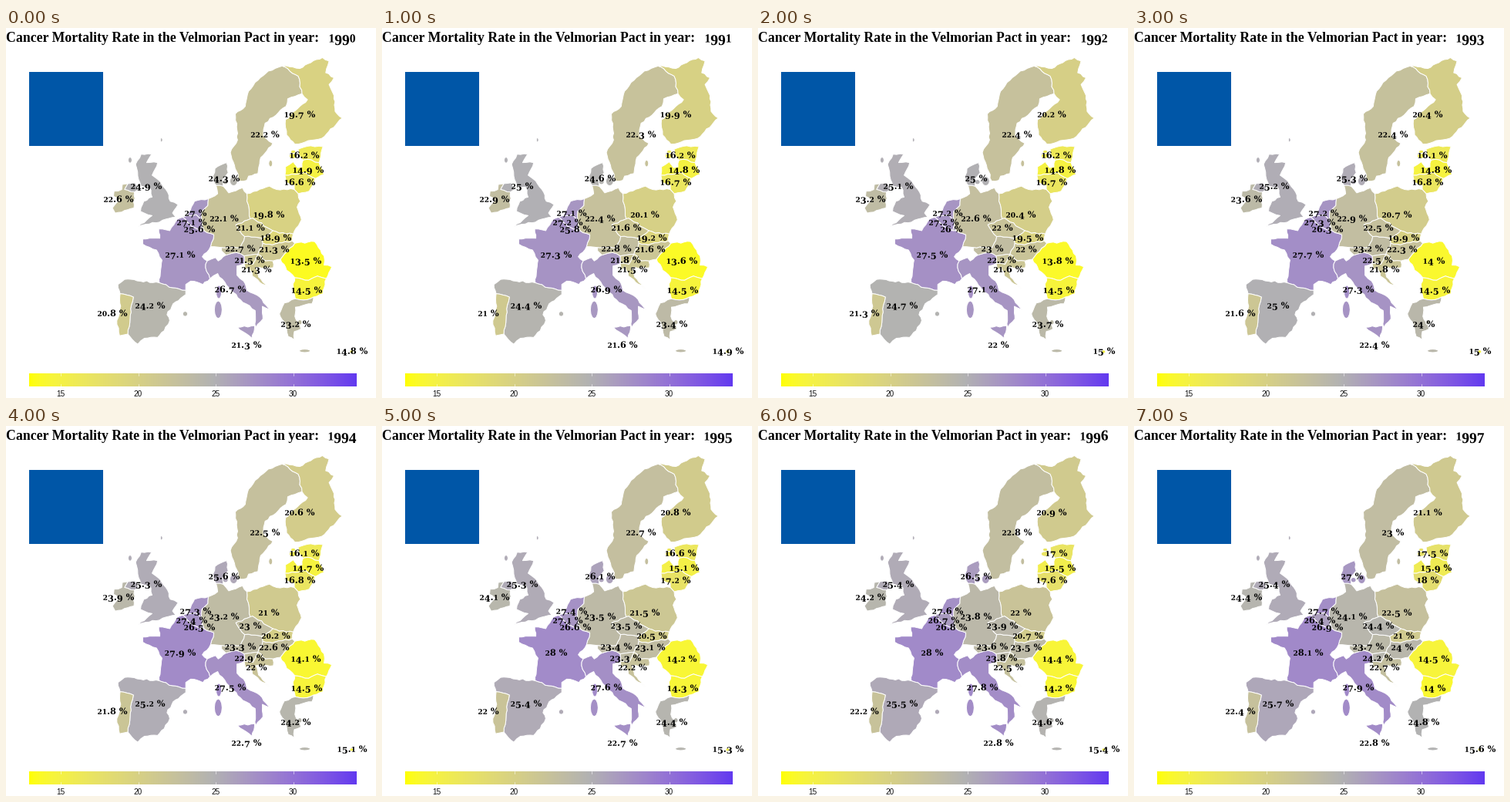
Write a matplotlib script that moves like this. It is 480x480 px and loops after 8000 ms.

```python
import random

import matplotlib.pyplot as plt
import numpy as np
from matplotlib.animation import FuncAnimation
from matplotlib.patches import PathPatch, Polygon, Rectangle
from matplotlib.path import Path
from matplotlib.textpath import TextPath

SIZE, DPI = 480, 100
PX = 72 / DPI
FIRST_YEAR, YEARS = 1990, 8
LOW, MIDDLE, HIGH = 12.96, 24.8, 34.1

# CIE Lab
YELLOW, GREY, BLUE = np.array([(97.1, -21.6, 94.5), (72.6, 0, 0), (32.3, 79.2, -107.9)])

LABEL_FONT = {"family": "DejaVu Serif", "weight": "bold"}
TITLE_FONT = {"family": "Liberation Serif", "weight": "bold"}

fig = plt.figure(figsize=(SIZE / DPI, SIZE / DPI), dpi=DPI, facecolor="white")
ax = fig.add_axes([0, 0, 1, 1])
ax.axis("off")


def lab_to_rgb(lab):
    f = (lab[0] + 16) / 116
    f = np.array([f + lab[1] / 500, f, f - lab[2] / 200])
    xyz = np.where(f > 6 / 29, f ** 3, 3 * (6 / 29) ** 2 * (f - 4 / 29))
    to_linear = np.array([(3.2405, -1.5371, -0.4985),
                          (-0.9693, 1.8760, 0.0416),
                          (0.0556, -0.2040, 1.0572)])
    linear = np.clip(to_linear @ (xyz * [0.9505, 1, 1.089]), 0, 1)
    return np.where(linear <= 0.0031308, 12.92 * linear,
                    1.055 * linear ** (1 / 2.4) - 0.055)


def rate_color(rate):
    """Diverging scale, blended in Lab, equally steep on both sides."""
    t = np.clip((rate - MIDDLE) / (MIDDLE - LOW), -1, 1)
    end = YELLOW if t < 0 else BLUE
    return lab_to_rgb(GREY + abs(t) * (end - GREY))


def right_edge(text, size, font):
    return TextPath((0, 0), text, size=size, prop=font).vertices[:, 0].max()


def old_style(text, cx, base, size, font):
    """Centred text path with old-style numerals."""
    x, glyphs = 0, []
    for ch in text:
        s = size * (0.8 if ch in "012" else 1)
        drop = size * (0.18 if ch in "34579" else 0)
        if ch != " ":
            glyphs.append(TextPath((x, -drop), ch, size=s, prop=font))
        x += right_edge(ch + "|", s, font) - right_edge("|", s, font)
    path = Path.make_compound_path(*glyphs)
    return Path(path.vertices * [1, -1] + [cx - x / 2, base], path.codes)


def text_patch():
    return ax.add_patch(PathPatch(Path([[0, 0]]), fc="black", lw=0, zorder=5))


def project(lon, lat):
    return 211 + 7.15 * lon, 421 - 10.9 * (lat - 35)


def rough_edge(p, q):
    """Jagged line from p to q, the same for both neighbours."""
    lo, hi = np.array(sorted([p, q]))
    rng = random.Random(f"{lo.round(2)}{hi.round(2)}")
    dx, dy = hi - lo
    length = np.hypot(dx, dy)
    n = max(1, int(length / 4))
    points = []
    for i in range(n + 1):
        shift = rng.uniform(-1, 1) if 0 < i < n else 0
        points.append(lo + (hi - lo) * i / n + np.array([-dy, dx]) / length * shift)
    if p > q:
        points.reverse()
    return points[:-1]


def outline(*coords):
    """Jagged ring through lon, lat, lon, lat, ..."""
    ring = [project(*c) for c in zip(coords[::2], coords[1::2])]
    return [pt for p, q in zip(ring, ring[1:] + ring[:1]) for pt in rough_edge(p, q)]


def island(lon, lat, width, height):
    a = np.linspace(0, 2 * np.pi, 12, endpoint=False)
    return np.column_stack(project(lon + width / 2 * np.cos(a),
                                   lat + height / 2 * np.sin(a)))


class Country:
    """Rates are given for the first year, four years on and the last year."""

    def __init__(self, rates, label, *shapes):
        self.rates = np.interp(range(YEARS), [0, 4, YEARS - 1], rates)
        self.label = label
        self.shapes = [ax.add_patch(Polygon(s, ec="white", lw=0.7, joinstyle="round"))
                       for s in shapes]
        self.text = text_patch()

    def show(self, i):
        rate = self.rates[i]
        for shape in self.shapes:
            shape.set_facecolor(rate_color(rate))
        x, y = self.label
        self.text.set_path(
            old_style(f"{round(rate, 1):g} %", x, y + 3.8, 11.3, LABEL_FONT))


countries = []


def land(*args):
    countries.append(Country(*args))


# Sweden, Finland
land((22.2, 22.5, 23), (336, 138),
     outline(20.6, 69.1, 23.5, 67.9, 24.2, 65.8, 21.6, 65.2, 21.3, 64.3, 17.5, 62.3,
             17.2, 60.8, 18.9, 59.9, 16.7, 58.2, 16.2, 56.3, 14.5, 56, 14.2, 55.5,
             12.9, 55.4, 11.2, 58.8, 12.5, 60.3, 12.1, 63.4, 13.9, 64.3, 14.5, 66.1,
             16.2, 67.4, 18.1, 68.5),
     island(18.5, 57.5, 0.7, 0.8))
land((19.7, 20.6, 21.1), (381, 112),
     outline(20.6, 69.1, 23.8, 68.8, 25.8, 69.5, 27.9, 70.1, 29.1, 69.7, 28.5, 68.3,
             30, 67.7, 29.1, 66.9, 30, 65.6, 30.2, 63.7, 31.5, 62.9, 27.8, 60.5,
             22.9, 59.8, 21.4, 60.9, 21.2, 62.7, 25.2, 65.1, 24.2, 65.8, 23.5, 67.9))

# Estonia, Latvia, Lithuania
land((16.2, 16.1, 17.5), (387, 165),
     outline(23.5, 59.2, 25.8, 59.6, 28, 59.5, 27.3, 57.6, 25.2, 58, 24.4, 57.9,
             23.6, 58.6),
     island(22.6, 58.4, 1.5, 0.6), island(22.6, 58.9, 0.9, 0.4))
land((14.9, 14.7, 15.9), (392, 184),
     outline(24.4, 57.9, 25.2, 58, 27.3, 57.6, 28.2, 56.2, 26.6, 55.7, 24.9, 56.4,
             21.1, 56.1, 21.2, 57.1, 22.6, 57.7, 23.4, 57, 24.2, 57.1))
land((16.6, 16.8, 18), (381, 200),
     outline(21.1, 56.1, 24.9, 56.4, 26.6, 55.7, 25.5, 54.2, 23.5, 53.9, 22.8, 54.4,
             22.8, 54.9, 21.3, 55.3))

# Poland, Germany, Denmark
land((19.8, 21, 22.5), (341, 242),
     outline(14.2, 53.9, 18.3, 54.8, 19.6, 54.4, 22.8, 54.4, 23.5, 53.9, 23.9, 53,
             23.3, 52.3, 24.1, 50.8, 22.6, 49.1, 20.1, 49.2, 18.9, 49.5, 15.2, 51,
             14.8, 50.9, 14.6, 52, 14.2, 53))
land((22.1, 23.2, 24.1), (283, 247),
     outline(8.6, 54.9, 9.9, 54.8, 10.9, 54, 13.4, 54.6, 14.2, 53.9, 14.2, 53,
             14.6, 52, 14.8, 50.9, 12.2, 50.2, 13.8, 48.8, 13, 47.5, 9.6, 47.5,
             7.6, 47.6, 8.2, 49, 6.4, 49.5, 6.1, 50.1, 6, 50.8, 6, 51.8, 7.1, 52.5,
             7.2, 53.3, 8.9, 53.9))
land((24.3, 25.6, 27), (283, 195),
     outline(8.6, 54.9, 9.9, 54.8, 9.8, 55.6, 10.8, 56.4, 10.5, 57.6, 8.4, 56.9,
             8.1, 55.6),
     island(10.3, 55.3, 1, 0.6), island(11.8, 55.4, 1.4, 1.1))

# Netherlands, Belgium, Luxembourg
land((27, 27.3, 27.7), (246, 240),
     outline(6, 50.8, 5, 51.4, 3.4, 51.3, 4.7, 53, 7.2, 53.3, 7.1, 52.5, 6, 51.8))
land((27.1, 27.4, 26.4), (241, 252),
     outline(2.5, 51.1, 3.4, 51.3, 5, 51.4, 6, 50.8, 6.1, 50.1, 5.8, 49.5, 4.2, 50))
land((25.6, 26.5, 26.9), (251, 261), outline(6.1, 50.1, 6.4, 49.5, 5.8, 49.5))

# France, Spain, Portugal
land((27.1, 27.9, 28.1), (226, 294),
     outline(2.5, 51.1, 4.2, 50, 5.8, 49.5, 6.4, 49.5, 8.2, 49, 7.6, 47.6, 6.1, 46.4,
             7, 45.9, 6.7, 45.1, 7.5, 43.8, 6.2, 43.1, 4, 43.5, 3.1, 43.1, 3.1, 42.4,
             0.7, 42.7, -1.7, 43.3, -1.2, 46, -2.2, 47.2, -4.7, 47.9, -4.7, 48.5,
             -1.6, 48.6, -1.8, 49.7, 0.2, 49.5, 1.6, 50.9),
     island(9.1, 42.2, 1, 1.6))
land((24.2, 25.2, 25.7), (187, 360),
     outline(-1.7, 43.3, 0.7, 42.7, 3.1, 42.4, 3.1, 41.9, 0.8, 40.8, -0.3, 39.5,
             0.2, 38.8, -0.8, 37.6, -2, 36.8, -4.4, 36.7, -5.6, 36, -7.4, 37.2,
             -7, 39, -6.9, 40.2, -6.4, 41.6, -8.8, 42, -9.2, 43.1, -8, 43.7),
     island(3, 39.6, 0.9, 0.6))
land((20.8, 21.8, 22.4), (138, 370),
     outline(-8.8, 42, -6.4, 41.6, -6.9, 40.2, -7, 39, -7.4, 37.2, -8.9, 37,
             -9.4, 38.8, -8.7, 40.5))

# Italy
land((26.7, 27.5, 27.9), (291, 339),
     outline(7.5, 43.8, 6.7, 45.1, 7, 45.9, 8.5, 46.3, 9, 45.9, 10.4, 46.6,
             12.3, 46.9, 13.7, 46.5, 13.7, 45.6, 12.4, 45.3, 12.4, 44.2, 13.6, 43.5,
             14.2, 42.4, 16.1, 41.8, 18.4, 40.1, 17, 40.5, 17.1, 39, 15.8, 38,
             15.7, 40, 13, 41.3, 10.5, 43, 8.9, 44.4),
     outline(12.5, 38, 15.6, 38.2, 15.1, 36.7), island(9, 40.1, 1.4, 2.1))

# United Kingdom, Ireland
land((24.9, 25.3, 25.4), (182, 205),
     outline(-5, 58.6, -3.1, 58.6, -4, 57.6, -2, 57.6, -3, 56.1, -1.6, 55.4,
             -0.2, 54.1, 0.3, 53, 1.7, 52.6, 0.7, 51.6, 1.3, 51.1, -3.5, 50.3,
             -5.5, 50, -3, 51.3, -5.1, 51.8, -4.5, 53, -3, 53.5, -3.5, 54.7,
             -5, 54.8, -5.6, 56, -6, 57.4),
     outline(-7.4, 55.1, -6.1, 55.2, -5.5, 54.4, -6.2, 54.1, -8, 54.4),
     island(-7, 57.9, 0.7, 0.7), island(-1.3, 60.3, 0.4, 0.5))
land((22.6, 23.9, 24.4), (146, 222),
     outline(-7.4, 55.1, -8, 54.4, -6.2, 54.1, -6.3, 52.2, -9.7, 51.6, -10.2, 52.2,
             -9, 53.1, -10, 53.6, -9.9, 54.2, -8.5, 54.4, -8.4, 55))

# Austria, Czechia, Slovakia, Hungary
land((22.7, 23.3, 23.7), (304, 286),
     outline(9.6, 47.5, 13, 47.5, 13.8, 48.8, 16.9, 48.6, 17.1, 48, 16.2, 46.7,
             13.7, 46.5, 12.3, 46.9, 10.4, 46.6, 9.6, 47.1))
land((21.1, 23, 24.4), (317, 259),
     outline(12.2, 50.2, 14.8, 50.9, 15.2, 51, 18.9, 49.5, 16.9, 48.6, 13.8, 48.8))
land((18.9, 20.2, 21), (350, 272),
     outline(16.9, 48.6, 18.9, 49.5, 20.1, 49.2, 22.6, 49.1, 22.4, 48.3, 18.8, 47.8,
             17.1, 48))
land((21.3, 22.6, 24), (348, 287),
     outline(17.1, 48, 18.8, 47.8, 22.4, 48.3, 22.9, 48, 20.3, 46.1, 18.9, 45.9,
             17.6, 45.9, 16.2, 46.7))

# Slovenia, Croatia
land((21.5, 22.9, 24.2), (316, 301),
     outline(13.7, 46.5, 16.2, 46.7, 15.3, 45.5, 13.7, 45.6))
land((21.3, 22, 22.7), (325, 313),
     outline(13.7, 45.6, 15.3, 45.5, 16.2, 46.7, 17.6, 45.9, 18.9, 45.9, 19, 45.1,
             15.8, 45.1, 16.3, 44, 18.4, 42.5, 15.2, 44.1, 14.6, 45.2, 13.9, 44.8))

# Romania, Bulgaria, Greece
land((13.5, 14.1, 14.5), (389, 302),
     outline(22.9, 48, 26.5, 48.2, 28.2, 46.5, 28.2, 45.4, 29.6, 45.2, 28.6, 43.8,
             27, 44.1, 25.4, 43.6, 22.9, 43.9, 21.4, 44.8, 20.3, 46.1))
land((14.5, 14.5, 14), (390, 340),
     outline(22.9, 43.9, 25.4, 43.6, 27, 44.1, 28.6, 43.8, 28, 42, 26.3, 41.6,
             25.2, 41.3, 23, 41.4, 22.4, 42.4))
land((23.2, 24.2, 24.8), (376, 384),
     outline(23, 41.4, 25.2, 41.3, 26.3, 41.6, 26, 40.8, 23, 40.4, 22.9, 39.3,
             24, 37.8, 22.8, 37.5, 22.8, 36.5, 21.7, 36.9, 21.2, 38.3, 20.1, 39.6,
             21, 40.9),
     island(23.8, 38.6, 0.8, 0.6), island(24.7, 35.2, 2, 0.4))

# Malta (too small to draw), Cyprus
land((21.3, 22.7, 22.8), (312, 411))
land((14.8, 15.1, 15.6), (449, 419), island(33.2, 35.1, 0.7, 0.4))

ax.add_patch(Rectangle((30, 57), 96, 96, fc="#0056a7", lw=0))
ax.text(0, 18.5, "Cancer Mortality Rate in the Velmorian Pact in year:",
        fontsize=17.8 * PX, va="baseline", **TITLE_FONT)
year_text = text_patch()

# Colour bar
bar = [[rate_color(r) for r in np.linspace(LOW, HIGH, 425)]]
ax.imshow(bar, aspect="auto", extent=(30, 455, 465, 448), interpolation="nearest")
for value in range(15, 31, 5):
    x = 30 + 425 * (value - LOW) / (HIGH - LOW)
    for top in (448, 462):
        ax.plot([x, x], [top, top + 3], color="white", lw=0.4)
    ax.text(x, 478.5, str(value), fontsize=10 * PX, ha="center", va="baseline",
            family="Liberation Sans", color="#111111")
ax.set_xlim(0, SIZE)
ax.set_ylim(SIZE, 0)


def update(i):
    for country in countries:
        country.show(i)
    year_text.set_path(old_style(str(FIRST_YEAR + i), 436, 18.5, 19.5, TITLE_FONT))


anim = FuncAnimation(fig, update, frames=YEARS, interval=1000, repeat=True)
plt.show()
```
